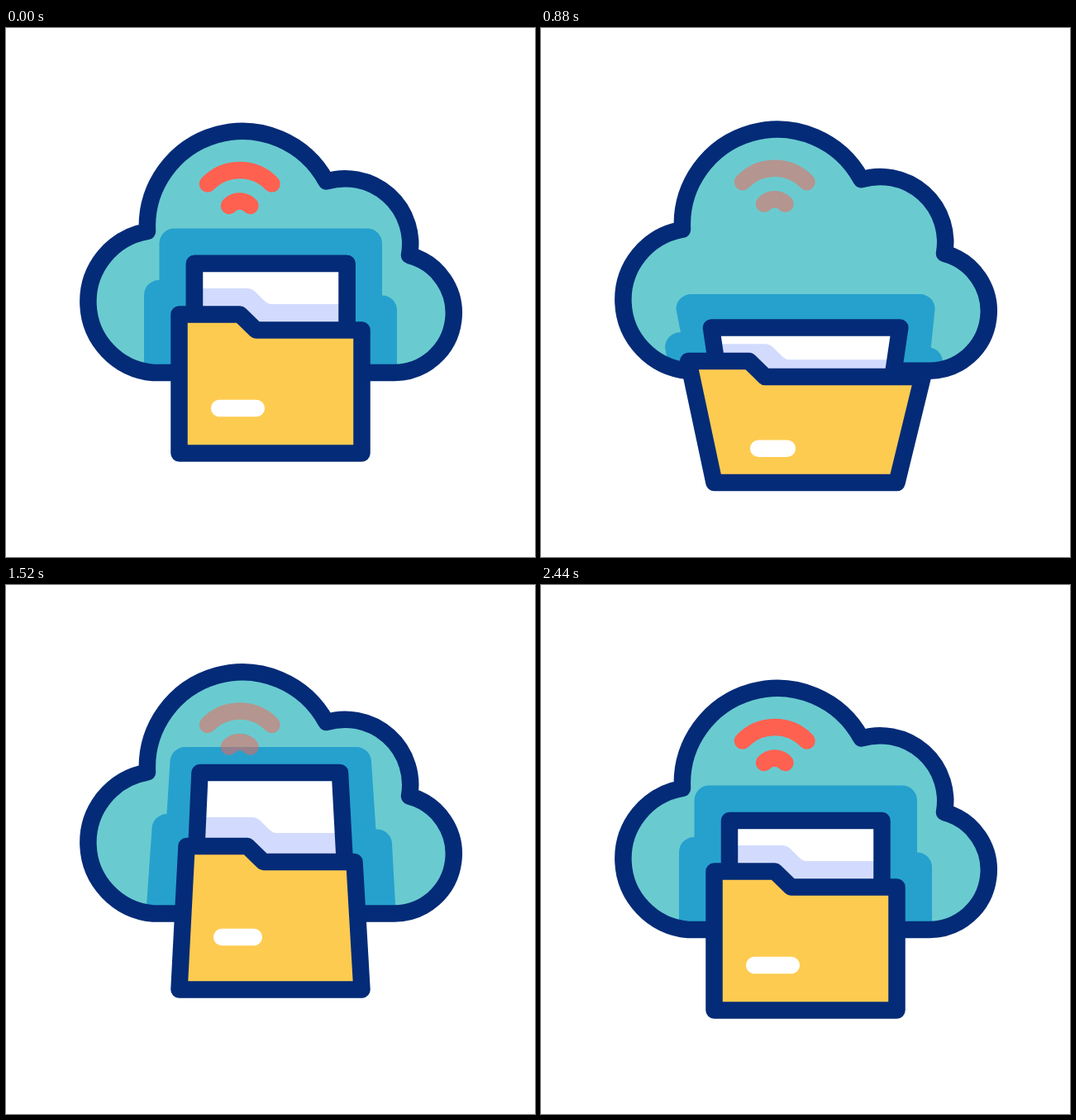
Write an HTML page that moves like this. It is 640 px wide and 640 px high and loops after 2.84 s.

```html
<!DOCTYPE html>
<html lang="en">
<head>
<meta charset="utf-8">
<title>Cloud folder</title>
<style>
  html, body { margin: 0; width: 100%; height: 100%; overflow: hidden; background: #fff; }
  svg { display: block; width: 100vw; height: 100vh; }
  .line { stroke: #042b77; stroke-width: 20.5; stroke-linejoin: round; stroke-linecap: round; }
  .wave { fill: none; stroke: #ff6150; stroke-width: 20.5; stroke-linecap: round; }
  .none { fill: none; }
  .white { fill: #fff; }
  .tint { fill: #d2dbfe; }
</style>
</head>
<body>
<svg viewBox="0 0 640 640">
  <defs>
    <path id="cloud" d="M470 417H178A86.3 86.3 0 0 1 171 246A115.2 115.2 0 0 1 387.5 185.5A79 79 0 0 1 488 275A72.2 72.2 0 0 1 470 417Z"/>
    <clipPath id="inCloud"><use href="#cloud" class="sky"/></clipPath>
    <clipPath id="inPaper"><path class="sheet"/></clipPath>
    <clipPath id="inOld"><path class="oldSheet"/></clipPath>
  </defs>
  <use href="#cloud" class="sky" fill="#69cbd0"/>
  <g clip-path="url(#inCloud)"><path id="shade" fill="#26a1cd"/></g>
  <g class="sky">
    <path id="bigWave" class="wave" d="M244 188.5A53.8 53.8 0 0 1 321.5 188.5"/>
    <path id="smallWave" class="wave" d="M270 215A17.5 17.5 0 0 1 295.5 215"/>
    <use href="#cloud" class="line none"/>
  </g>
  <g>
    <path class="sheet white"/>
    <g clip-path="url(#inPaper)"><path id="tint" class="tint"/></g>
    <path class="sheet line none"/>
  </g>
  <g id="old">
    <path class="oldSheet white"/>
    <g clip-path="url(#inOld)"><path id="oldTint" class="tint"/></g>
    <path class="oldSheet line none"/>
  </g>
  <path id="folder" class="line" fill="#fdcb50"/>
  <path id="label" class="line" style="stroke:#fff"/>
</svg>
<script>
const LOOP = 2840;
const $ = id => document.getElementById(id);
const setPath = (sel, d) => document.querySelectorAll(sel).forEach(el => el.setAttribute('d', d));

// cubic-bezier(x1, 0, x2, 1)
function ease(x1, x2, x) {
  if (x <= 0) return 0;
  if (x >= 1) return 1;
  let lo = 0, hi = 1, u;
  for (let i = 0; i < 22; i++) {
    u = (lo + hi) / 2;
    const v = 1 - u;
    if (3 * u * v * v * x1 + 3 * u * u * v * x2 + u * u * u < x) lo = u; else hi = u;
  }
  return u * u * (3 - 2 * u);
}
const span = (t, from, to, x2 = 0.1) => ease(0.33, x2, (t - from) / (to - from));

const tintPath = (x, y) =>
  `M150 ${y}H${x}q5 0 9 3.5l11 11q5 4.5 9 4.5H480V470H150Z`;

const sheetPath = (l, r, top, bl, br) => `M${bl} 460L${l} ${top}H${r}L${br} 460Z`;

function draw(t) {
  const down = span(t, 0, 760, 0.42);
  const up = span(t, 760, 1520);
  const back = span(t, 1510, 2190);
  const squash = down * (1 - up), stretch = up * (1 - back);
  const mix = (rest, s, k) => rest + s * squash + k * stretch;

  // Cloud and signal
  const lift = -19.5 * span(t, 768, 1520) * (1 - span(t, 1560, 2230));
  document.querySelectorAll('.sky').forEach(el => el.setAttribute('transform', `translate(0 ${lift})`));
  const signal = (off, on) => t < off ? 1 : t < 600 ? 0 : t < on ? 0.5 : 1;
  $('bigWave').setAttribute('opacity', signal(200, 2200));
  $('smallWave').setAttribute('opacity', signal(400, 2000));

  // Shade behind the folder
  const R = 18;
  const top = mix(242.5, 99, -46.5), flap = mix(305, 77.5, -28), flapR = flap + 18.5;
  const l = mix(185.5, -27.5, 13), r = mix(455, 27, -13);
  const il = mix(185.5, -20.5, 9), ir = mix(455, 20.5, -7.5);
  const fl = mix(167, -21, 9.5), fr = mix(473, 16, -6);
  const bl = mix(167, -9, -0.6), br = mix(473, 9, 1);
  const arc = (x, y) => `A${R} ${R} 0 0 1 ${x} ${y}`;
  $('shade').setAttribute('d',
    `M${bl} 440L${fl} ${flap + R}${arc(il, flap)}L${l} ${top + R}${arc(l + R, top)}` +
    `H${r - R}${arc(r, top + R)}L${ir} ${flapR}${arc(fr, flapR + R)}L${br} 440Z`);

  // Paper
  setPath('.sheet', sheetPath(
    mix(228, -26.5, 6.5), mix(412.5, 26.5, -8.5), mix(285, 98.5, -58),
    mix(228, -8, -4), mix(412.5, 8, 4)));
  $('tint').setAttribute('d', tintPath(mix(292, -25, 6), mix(315, 83, -34)));

  // Second sheet slipping into the folder
  const showOld = t < 600;
  $('old').setAttribute('visibility', showOld ? 'visible' : 'hidden');
  if (showOld) {
    setPath('.oldSheet', sheetPath(228, 412.5, Math.min(285 + 172 * down, 455), 228, 412.5));
    $('oldTint').setAttribute('d', tintPath(292 - 15 * down, 315 + 135 * down));
  }

  // Folder
  const side = mix(0, 37.5, -9), edge = mix(346.5, 70, -30.5), base = mix(514.5, 45, -25);
  $('folder').setAttribute('d',
    `M209.5 ${base}L${209.5 - side} ${edge}H${283 - side}L${302.5 - side} ${edge + 19}` +
    `H${430.5 + side}L430.5 ${base}Z`);
  const inset = mix(0, 5.3, 3);
  $('label').setAttribute('d', `M${258.2 + inset} ${mix(460, 61.5, -34)}H${302.8 - inset}`);
}

const start = performance.now();
function tick() {
  draw((performance.now() - start) % LOOP);
  requestAnimationFrame(tick);
}
tick();
</script>
</body>
</html>
```
